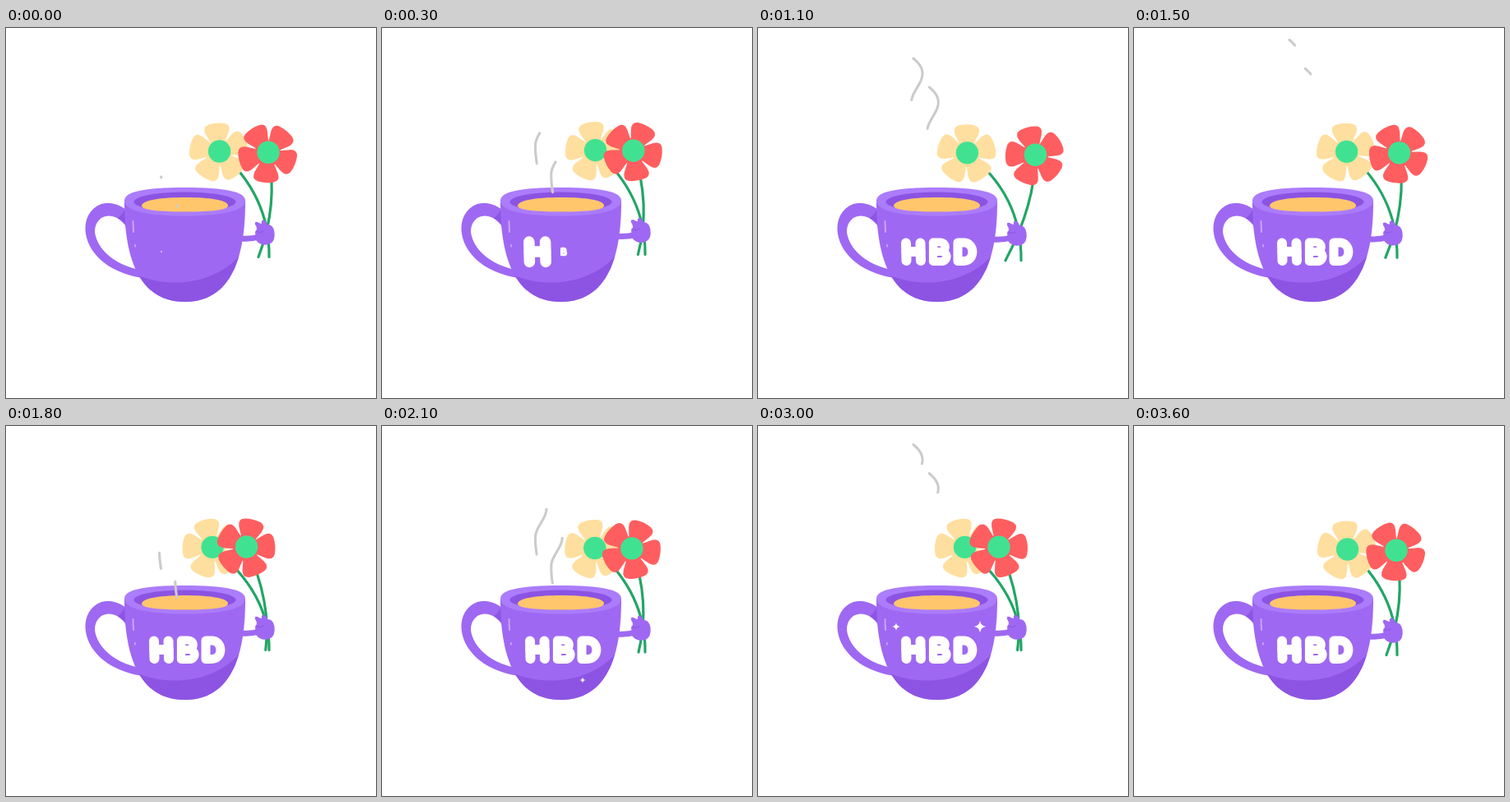
An HTML page with a canvas for the animation above (3.7 s loop, 450x450 px).

```html
<!DOCTYPE html>
<html lang="en">
<head>
<meta charset="utf-8">
<title>Birthday cup</title>
<style>
html, body { margin: 0; width: 100%; height: 100%; overflow: hidden; background: #fff; }
canvas { display: block; width: 450px; height: 450px; }
</style>
</head>
<body>
<canvas id="stage" width="450" height="450"></canvas>
<script>
const ctx = document.getElementById('stage').getContext('2d');
const LOOP = 3700, STEP = 100;
const C = {
  body: '#9f68f2', shade: '#8d54e3', rim: '#ab7cfb', inside: '#8b53e2', coffee: '#ffc66c',
  red: '#ff5e60', cream: '#ffdf9f', heart: '#40e292', stem: '#22a566', steam: '#cbcbcb'
};

const linear = p => p;
const sine = p => (1 - Math.cos(Math.PI * p)) / 2;

// Value at time t through [time, value] keys
function keyed(t, keys, ease = sine) {
  if (t <= keys[0][0]) return keys[0][1];
  for (let i = 1; i < keys.length; i++) {
    const [t0, a] = keys[i - 1], [t1, b] = keys[i];
    if (t <= t1) return a + (b - a) * ease((t - t0) / (t1 - t0));
  }
  return keys[keys.length - 1][1];
}

function fill(d, color) {
  ctx.fillStyle = color;
  ctx.fill(new Path2D(d), 'evenodd');
}

function stroke(d, color, width) {
  ctx.strokeStyle = color;
  ctx.lineWidth = width;
  ctx.lineCap = ctx.lineJoin = 'round';
  ctx.stroke(new Path2D(d));
}

function ellipse(x, y, rx, ry, color) {
  ctx.fillStyle = color;
  ctx.beginPath();
  ctx.ellipse(x, y, rx, ry, 0, 0, 7);
  ctx.fill();
}

function at(x, y, draw) {
  ctx.save();
  ctx.translate(x, y);
  draw();
  ctx.restore();
}

// Bouquet
const SWAY = [[0, 319], [600, 292.5], [1290, 347], [1740, 292.5], [1830, 292.5],
  [2430, 319.5], [3000, 293], [3600, 319], [3700, 319]];
const PETAL = 'M9 -7 L23 -14 Q32 -18 34.5 -10 Q37 0 34.5 10 Q32 18 23 14 L9 7 Z';

function flower(x, y, degrees, color) {
  at(x - 0.8, y + 1.2, () => {
    ctx.rotate(degrees * Math.PI / 180);
    ellipse(0, 0, 16, 16, color);
    for (let i = 0; i < 5; i++) {
      fill(PETAL, color);
      ctx.rotate(Math.PI * 2 / 5);
    }
  });
  ellipse(x, y, 13.7, 13.7, C.heart);
}

function bouquet(t) {
  const x = keyed(t, SWAY), d = x - 319;
  const y = 151.3 + d * 0.16;
  const off = x - 314;
  const cx = 261 - (off < 0 ? 0.0215 * off * off : 0.28 * off);
  const cy = 150 + d * 0.1;
  const foot = 278.5 + d * 0.23;
  const turn = d;
  stroke(`M${cx} ${cy} Q321 203 320 ${foot}`, C.stem, 3.2);
  stroke(`M${x} ${y} Q${331.5 + d * 0.3} 215 ${307 - d * 0.33} ${foot}`, C.stem, 3.2);
  flower(cx, cy, 265 + turn * 0.3, C.cream);
  flower(x, y, 94 + turn, C.red);
  at(0, Math.max(-4, Math.min(1, d * 0.2)), hand);
}

function hand() {
  stroke('M286 256 Q298 257 308 254', C.body, 7);
  fill('M303 248 Q307 245 303 239 Q302 235 306 236 Q309 238 311 238 Q310 233 314 234 ' +
    'Q317 235 318 239 Q325 239 326.5 248 Q328 260 320 263 Q310 266 304 258 Z', C.body);
  stroke('M304 247 Q309 250 313 247', C.shade, 1);
}

// Cup
const BODY = 'M144 211 C144 262 153 333 217.5 333 C282 333 291 262 291 211 Z';
const HANDLE = 'M150 224 C136 212 124 212 116 214 C102 219 96 232 96.5 246 ' +
  'C98 270 120 297 166 304 L172 260 Z ' +
  'M145 240 C136 228 124 226 116 231 C108 237 107 246 109 253 C114 272 134 287 158 293 Z';

function cup() {
  fill(HANDLE, C.body);
  fill('M136 231 Q142 227 144 221 L148 223 L148 242 Q142 234 136 231 Z', C.shade);
  fill(BODY, C.body);
  ctx.save();
  ctx.clip(new Path2D(BODY));
  fill('M150 296 C188 317 255 318 292 268 L295 340 L145 340 Z', C.shade);
  ctx.restore();
  fill('M144 210 C144 199 168 194 217.5 194 C267 194 291 199 291 210 ' +
    'C291 222 264 228.5 217.5 228.5 C171 228.5 144 222 144 210 Z', C.rim);
  ellipse(217.5, 211.5, 62, 12, C.inside);
  fill('M165 216 C166 209 190 206 218 206 C246 206 270 209 270 216 ' +
    'C270 221.5 250 223.5 218 223.5 C186 223.5 165 221.5 165 216 Z', C.coffee);
  stroke('M154.5 235 L155 248', '#c7a5ff', 2);
  stroke('M157 264 L157 265.5', '#c7a5ff', 2);
}

// Lettering
const LETTERS = [
  { x: 189, width: 12, d: 'M-9 -10.5 L-8.5 11 M8.5 -10.5 L9 11 M-9 0 L9 0' },
  { x: 221, width: 10.2, d: 'M-8 -11.5 L-8 12 L1 12 C11 12 11 0 1 0 L-7 0 M-8 -11.5 L0 -11.5 C9 -11.5 9 0 0 0' },
  { x: 252, width: 11, d: 'M-9 -11 L-9 11.5 L-2 11.5 C12.5 11.5 12.5 -11 -2 -11 Z' }
];
const POP = [[0, 0.04], [300, 1.13], [450, 0.97], [600, 1]];

function lettering(t) {
  LETTERS.forEach((letter, i) => {
    const local = t - i * 200;
    if (local < 0) return;
    const s = keyed(local, POP);
    at(letter.x, 272, () => {
      ctx.scale(s, s);
      stroke(letter.d, '#fff', letter.width);
    });
  });
}

// Steam: u runs down the wisp, 0 at its crest
const RISE = [[0, 122], [450, 100], [600, 88], [850, 70], [1200, 49], [1600, 27]];
const TOP = [[0, 59], [600, -18]];
const BOTTOM = [[0, 60], [450, 56], [700, 61], [850, 60], [1560, -18]];

function wispX(u) {
  if (u < 0) return 200 - 11 * (u / 18) ** 2;
  if (u < 36) return 200 - 13.5 * sine(u / 36);
  return 186.5 + 2.5 * ((u - 36) / 25) ** 2;
}

function steam(t) {
  const local = t < 1650 ? t : t - 1650;
  const crest = keyed(local, RISE, linear);
  const top = keyed(local, TOP, linear), end = keyed(local, BOTTOM, linear);
  if (end <= top) return;
  let d = '';
  for (let i = 0; i <= 40; i++) {
    const u = top + (end - top) * i / 40;
    d += `${i ? 'L' : 'M'}${wispX(u)} ${crest + u}`;
  }
  stroke(d, C.steam, 3.1);
  at(19.3, 35, () => stroke(d, C.steam, 3.1));
}

// Sparkles: [x, y, start, peak, end, radius]
const SPARKS = [
  [244, 309, 1920, 2500, 2900, 15],
  [168, 244, 2380, 2820, 3200, 9],
  [270, 244, 2700, 3050, 3450, 7.5]
];

function sparkles(t) {
  for (const [x, y, start, peak, end, size] of SPARKS) {
    const r = keyed(t, [[start, 0], [peak, size], [end, 0]]);
    if (r < 0.2) continue;
    const n = r * 0.13;
    at(x, y, () => fill(`M0 ${-r} Q${n} ${-n} ${r} 0 Q${n} ${n} 0 ${r} ` +
      `Q${-n} ${n} ${-r} 0 Q${-n} ${-n} 0 ${-r} Z`, '#fff'));
  }
}

function frame(now) {
  const t = Math.floor((now - begin) % LOOP / STEP) * STEP;
  ctx.fillStyle = '#fff';
  ctx.fillRect(0, 0, 450, 450);
  bouquet(t);
  cup();
  steam(t);
  lettering(t);
  sparkles(t);
  requestAnimationFrame(() => frame(performance.now()));
}

const begin = performance.now();
frame(begin);
</script>
</body>
</html>
```
